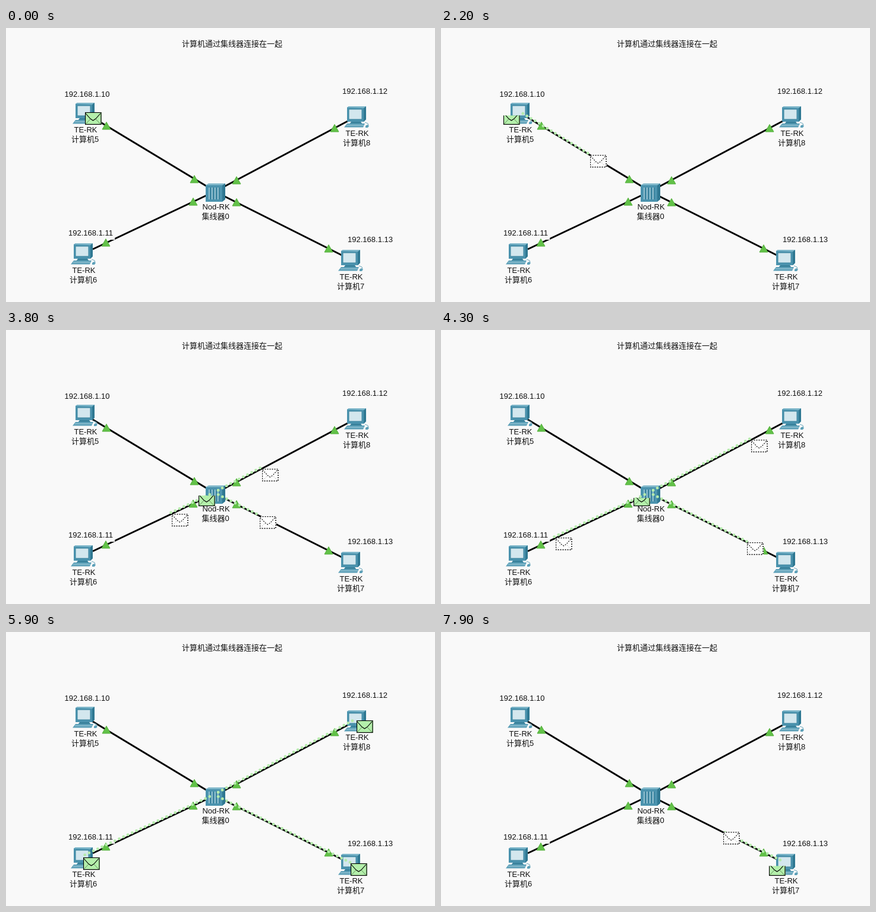
Write an HTML page with a canvas that moves like this. It is 722x462 px and loops after 8000 ms.

```html
<!DOCTYPE html>
<html lang="zh">
<head>
<meta charset="utf-8">
<title>集线器</title>
<style>
html, body { margin: 0; width: 100%; height: 100%; overflow: hidden; background: #f9f9f9; }
canvas { display: block; }
</style>
</head>
<body>
<canvas id="stage" width="722" height="462"></canvas>
<script>
const ctx = document.getElementById('stage').getContext('2d');
const LOOP = 8000, TICK = 100, TRAVEL = 1300;
const BG = '#f9f9f9', MAIL = '#b4efab';
const ENV_W = 27, ENV_H = 21, SOURCE_SHIFT = -28;
const FONT = '13px "Liberation Sans", "Noto Sans CJK SC", "Noto Sans CJK", sans-serif';

// Icon corner, label centres and address centre of each computer
const computers = [
  { icon: [112, 126], label: [134, 171], name: '计算机5', ip: '192.168.1.10', at: [136.5, 111] },
  { icon: [569, 132], label: [591, 177], name: '计算机8', ip: '192.168.1.12', at: [604, 106] },
  { icon: [109, 363], label: [131, 408], name: '计算机6', ip: '192.168.1.11', at: [142.5, 345] },
  { icon: [559, 374], label: [581, 419], name: '计算机7', ip: '192.168.1.13', at: [613, 356] }
];
const cables = [
  [146, 151, 338, 267], [368, 267, 577, 156],
  [146, 373, 338, 282], [368, 284, 565, 383]
];
const lights = [
  [169, 165], [317, 255], [388, 257], [553, 169],
  [315, 293], [168, 362], [388, 294], [543, 372]
];

// Resting places of the envelope
const spot = { pc5: [133, 142], hub: [352, 276], pc8: [590, 149], pc6: [130, 380], pc7: [580, 390] };
const targets = [spot.pc8, spot.pc6, spot.pc7];

function poly(points, fill, stroke) {
  ctx.beginPath();
  for (let i = 0; i < points.length; i += 2) ctx.lineTo(points[i], points[i + 1]);
  ctx.closePath();
  ctx.fillStyle = fill;
  ctx.fill();
  if (stroke) {
    ctx.strokeStyle = stroke;
    ctx.lineWidth = 1;
    ctx.stroke();
  }
}

function line(points, color, width) {
  ctx.beginPath();
  for (let i = 0; i < points.length; i += 2) ctx.lineTo(points[i], points[i + 1]);
  ctx.strokeStyle = color;
  ctx.lineWidth = width;
  ctx.stroke();
}

function text(str, x, y) {
  ctx.font = FONT;
  ctx.textAlign = 'center';
  ctx.fillStyle = '#111';
  ctx.fillText(str, x, y + 5);
}

function at([x, y], draw) {
  ctx.save();
  ctx.translate(x, y);
  draw();
  ctx.restore();
}

function drawComputer() {
  poly([5, 2, 8, 0, 37, 0, 37, 22, 33, 26, 5, 26], '#4b93ae');
  poly([33, 3, 37, 0, 37, 22, 33, 26], '#2f7892');
  poly([5, 2, 8, 0, 37, 0, 33, 3], '#7fb7ca');
  poly([8, 5, 30, 5, 30, 22, 8, 22], '#d3e7ee', '#3b839d');
  poly([12, 26, 28, 26, 31, 30, 9, 30], '#3a829c');
  poly([5, 29, 35, 29, 32, 35.5, 0, 35.5], '#5da0b8');
  line([4, 32, 33, 32], '#a9d0dd', 1);
  line([35, 27, 40, 29, 41, 32], '#6aa6bb', 1);
  poly([36, 33, 39, 31, 42, 33, 40, 36, 36, 36], '#5da0b8');
}

function drawHub() {
  poly([336, 265, 341, 262, 369, 262, 364, 265], '#82b9cb');
  poly([364, 265, 369, 262, 369, 289, 364, 293], '#2f7892');
  poly([336, 265, 364, 265, 364, 293, 336, 293], '#4b93ae');
  for (let x = 342; x < 360; x += 5) {
    line([x, 269, x, 289], '#b9dae4', 1.4);
    line([x + 1.5, 269, x + 1.5, 289], '#28708a', 1);
  }
}

function drawScene() {
  ctx.fillStyle = BG;
  ctx.fillRect(0, 0, 722, 462);
  for (const c of cables) line(c, '#000', 3);
  ctx.fillRect(104, 337, 79, 20);
  for (const [x, y] of lights) poly([x, y - 6.5, x + 7, y + 6, x - 7, y + 6], '#62c148', '#54b03c');
  for (const c of computers) {
    at(c.icon, drawComputer);
    text('TE-RK', ...c.label);
    text(c.name, c.label[0] - 1, c.label[1] + 16);
    text(c.ip, ...c.at);
  }
  drawHub();
  text('Nod-RK', 353.5, 301);
  text('集线器0', 352.5, 317);
  text('计算机通过集线器连接在一起', 380.5, 26);
}

// Draws the rows of an envelope from top to bottom
function envelope(pos, { top = 0, bottom = ENV_H + 1, ghost = false } = {}) {
  at(pos.map(Math.round), () => {
    ctx.beginPath();
    ctx.rect(0, top, ENV_W + 1, bottom - top);
    ctx.clip();
    ctx.fillStyle = ghost ? '#fff' : MAIL;
    ctx.fillRect(0, 0, ENV_W + 1, ENV_H);
    if (ghost) ctx.setLineDash([2, 2]);
    ctx.strokeStyle = '#000';
    ctx.lineWidth = ghost ? 1.4 : 1.2;
    ctx.strokeRect(0.5, 0.5, ENV_W - 0.5, ENV_H - 1);
    line([1, 2, 9, 11, 13.5, 14, 18, 11, 26, 2], '#000', 1.1);
    line([1, 20, 9, 11.5], ghost ? '#999' : '#4b7a45', 0.8);
    line([26, 20, 18, 11.5], ghost ? '#999' : '#4b7a45', 0.8);
  });
}

function cross([x, y]) {
  const arms = [x + 5, y + 5, x + 16, y + 16, x + 10.5, y + 10.5, x + 16, y + 4, x + 5, y + 17];
  line(arms, '#3a0a00', 5);
  line(arms, '#f04a1e', 3);
}

const mix = (a, b, p) => a.map((v, i) => v + (b[i] - v) * p);

function trail(from, to, p) {
  const length = Math.hypot(to[0] - from[0], to[1] - from[1]);
  ctx.fillStyle = '#b5ebac';
  for (let d = 8; d <= length * p + 2; d += 8) {
    const [x, y] = mix(from, to, d / length);
    ctx.beginPath();
    ctx.arc(x - 2, y - 2, 2.4, 0, 7);
    ctx.fill();
  }
}

// Dotted copies travel while the sender's envelope empties to half
function send(from, ends, elapsed) {
  const p = Math.min(1, Math.max(0, elapsed / TRAVEL));
  for (const end of ends) trail(from, end, p);
  envelope([from[0] + SOURCE_SHIFT, from[1]], { top: p * 10 });
  for (const end of ends) envelope(mix(from, end, p), { ghost: true });
}

// The arrived envelope fills from half to whole
function receive(from, ends, elapsed, showTrail) {
  const bottom = Math.min(ENV_H + 1, 11 + elapsed * 0.015);
  for (const end of ends) {
    if (showTrail) trail(from, end, 1);
    envelope(end, { bottom });
  }
}

function draw(t) {
  drawScene();
  if (t < 1500) envelope(spot.pc5);
  else if (t < 2900) send(spot.pc5, [spot.hub], t - 1500);
  else if (t < 3300) receive(spot.pc5, [spot.hub], t - 2900, t < 3200);
  else if (t < 4800) send(spot.hub, targets, t - 3370);
  else if (t < 7300) {
    receive(spot.hub, targets, t - 4800, t < 6000);
    if (t >= 6000) [spot.pc8, spot.pc6].forEach(cross);
  } else send(spot.pc7, [spot.hub], t - 7300);
}

const start = performance.now();
function frame() {
  const t = (performance.now() - start) % LOOP;
  draw(Math.floor(t / TICK) * TICK);
  requestAnimationFrame(frame);
}
frame();
</script>
</body>
</html>
```
